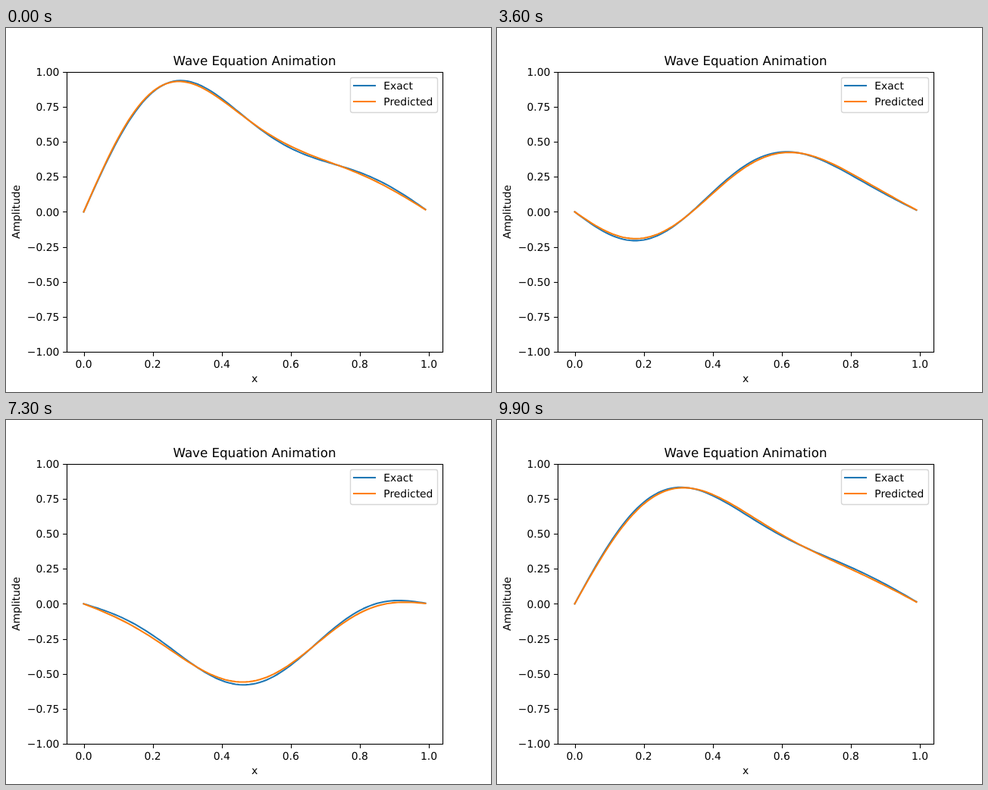
Write an HTML page that moves like this. It is 640x480 px and loops after 10 s.

```html
<!DOCTYPE html>
<html lang="en">
<head>
<meta charset="utf-8">
<title>Wave Equation Animation</title>
<style>
  html, body { margin: 0; width: 100%; height: 100%; overflow: hidden; background: #fff; }
  svg { display: block; width: 640px; height: 480px; }
  text { font: 13.889px "DejaVu Sans", sans-serif; text-rendering: geometricPrecision; fill: #000; }
  .title { font-size: 16.667px; }
  .mid { text-anchor: middle; }
  .end { text-anchor: end; }
  .axis { fill: none; stroke: #000; stroke-width: 1.11; }
  .curve { fill: none; stroke-width: 2.083; stroke-linecap: square; stroke-linejoin: round; }
  .exact { stroke: #1f77b4; }
  .predicted { stroke: #ff7f0e; }
</style>
</head>
<body>
<svg viewBox="0 0 640 480">
  <path id="exact" class="curve exact"/>
  <path id="predicted" class="curve predicted"/>
  <g id="ticks"></g>
  <rect class="axis" x="80.5" y="58.5" width="496" height="369"/>
  <text class="title mid" x="328" y="49">Wave Equation Animation</text>
  <text class="mid" x="328" y="467">x</text>
  <text class="mid" transform="translate(18 242.4) rotate(-90)">Amplitude</text>
  <rect x="454.5" y="65.5" width="115" height="46" rx="2.8"
        fill="#fff" fill-opacity=".8" stroke="#ccc" stroke-opacity=".8" stroke-width="1.39"/>
  <path class="curve exact" d="M459 76H487"/>
  <path class="curve predicted" d="M459 97H487"/>
  <text x="498.3" y="81">Exact</text>
  <text x="498.3" y="102">Predicted</text>
</svg>
<script>
const STEP = 100, STEPS = 100;
const px = x => 102.545 + 455.46 * x;
const py = u => 242.4 - 184.8 * u;
const snap = v => Math.round(v) + 0.5;

// Ticks and their labels
let marks = '';
for (let i = 0; i <= 5; i++) {
  const x = px(i / 5);
  marks += `<path class="axis" d="M${snap(x)} 428v4.86"/>` +
           `<text class="mid" x="${x}" y="448">${(i / 5).toFixed(1)}</text>`;
}
for (let i = -4; i <= 4; i++) {
  const y = py(i / 4);
  const label = (i < 0 ? '\u2212' : '') + Math.abs(i / 4).toFixed(2);
  marks += `<path class="axis" d="M80 ${snap(y)}h-4.86"/>` +
           `<text class="end" x="70.3" y="${Math.round(y + 5.1)}">${label}</text>`;
}
document.getElementById('ticks').innerHTML = marks;

// Standing waves: amplitude of each harmonic on a string of length 1
const MODES = [0.7465, 0.3015, 0.135, 0];

// The prediction loses some of the third harmonic as time goes on
function predictedModes(t) {
  const [a, b, c] = MODES;
  const loss = 0.003 + 0.022 * (1 - Math.exp(-t / 4));
  return [a, b, c - loss, 0.013 * Math.exp(-t / 4)];
}

function wave(modes, t) {
  const points = [];
  for (let i = 0; i < 100; i++) {
    const x = i / 100;
    const u = modes.reduce((sum, a, k) => {
      const w = (k + 1) * Math.PI;
      return sum + a * Math.sin(w * x) * Math.cos(w * t);
    }, 0);
    points.push(px(x).toFixed(2) + ' ' + py(u).toFixed(2));
  }
  return 'M' + points.join('L');
}

const exact = document.getElementById('exact');
const predicted = document.getElementById('predicted');
let shown = -1;

function draw(now) {
  const step = Math.floor(now / STEP) % STEPS;
  if (step !== shown) {
    shown = step;
    const t = step / 10;
    exact.setAttribute('d', wave(MODES, t));
    predicted.setAttribute('d', wave(predictedModes(t), t));
  }
}

let start = null;
function tick(now) {
  if (start === null) start = now;
  draw(now - start);
  requestAnimationFrame(tick);
}
draw(0);
requestAnimationFrame(tick);
</script>
</body>
</html>
```
